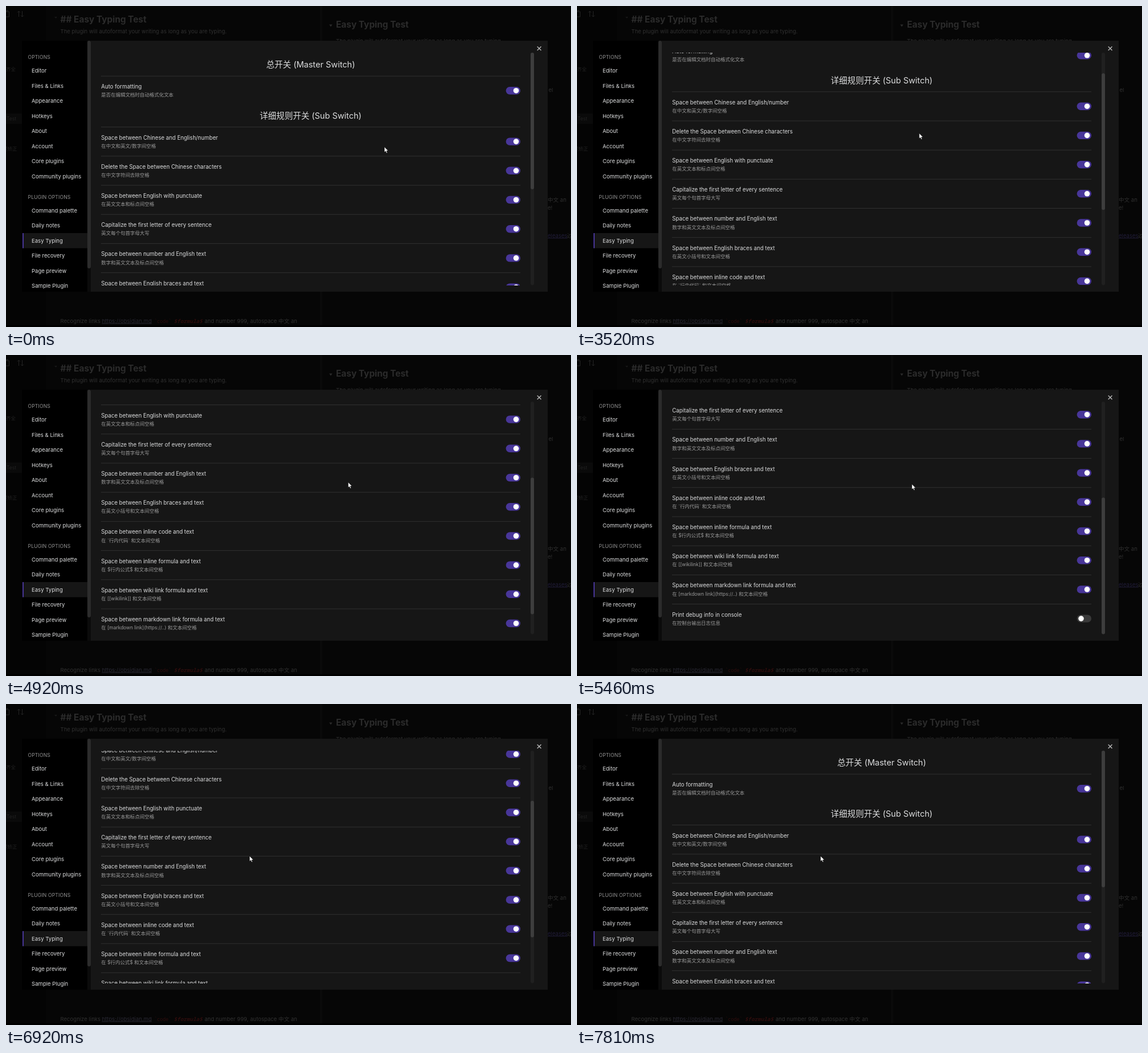
These frames come from a looping animation (993 px wide and 564 px high, 7.99 s). An HTML page:

```html
<!DOCTYPE html>
<html lang="zh-CN">
<head>
<meta charset="utf-8">
<title>Plugin settings</title>
<style>
  html, body { margin: 0; width: 100%; height: 100%; overflow: hidden; background: #000; }
  svg { display: block; font: 9.57px Inter, "Noto Sans CJK SC", "Noto Sans CJK", sans-serif; }
  text { white-space: pre; }
  .dim { fill: #303030; }
  .faint { font-size: 8.47px; fill: #222; }
  .title { font-size: 15.4px; font-weight: 700; fill: #2b2b2b; }
  .link { fill: #211d38; text-decoration: underline; }
  .url { fill: #292833; text-decoration: underline; }
  .mono { font: 8.3px "Noto Sans Mono", monospace; fill: #2e0d0d; }
  .formula { font: italic 700 9.3px "Noto Sans Mono", monospace; fill: #2e0d0d; }
  .nav { fill: #dcddde; }
  .name { font-size: 9.68px; fill: #dcddde; }
  .caps { font-size: 8.6px; letter-spacing: .15px; fill: #929292; }
  .head { font-size: 14.52px; fill: #dcddde; text-anchor: middle; }
  .desc { font-size: 8.47px; fill: #999; }
</style>
</head>
<body>
<svg id="stage" width="993" height="564" viewBox="0 0 993 564"></svg>
<script>
const LOOP = 7990, MAX_SCROLL = 287, ROW = 51.2;

const text = (x, y, str, cls) => `<text x="${x}" y="${y}" class="${cls}">${str}</text>`;
const rect = (x, y, w, h, fill, r = 0) =>
  `<rect x="${x}" y="${y}" width="${w}" height="${h}" rx="${r}" fill="${fill}"/>`;

function backdrop() {
  const intro = 'The plugin will autoformat your writing as long as you are typing.';
  return rect(0, 0, 993, 560.5, '#040404') + rect(70, 0, 923, 560.5, '#060606') +
    rect(552, 0, 4, 560.5, '#0a0a0a') + rect(0, 189, 28, 18, '#0a0a0a') +
    '<path d="M-2 10H5.5V19H-2M1 10V8H4M22.5 9V19M20 11.5L22.5 9L25 11.5M28.5 9V19M26 16.5L28.5 19L31 16.5" fill="none" stroke="#242424"/>' +
    '<path d="M85 19h5l-2.5 3z" fill="#181818"/><path d="M568 32.5h5.5l-2.7 4z" fill="#2b2b2b"/>' +
    text(95.5, 29, '## Easy Typing Test', 'title') +
    text(580, 38, 'Easy Typing Test', 'title') +
    text(95.5, 48.3, intro, 'dim') + text(580, 65, intro, 'dim') +
    text(0, 114, '齐全', 'faint') + text(-6, 254, '楚矫正', 'faint') +
    text(1, 201.3, 'Test', 'faint') +
    text(953.5, 151, 'el', 'dim') + text(952, 344, '中文 an', 'dim') + text(952, 358, 'e!', 'dim') +
    text(952, 406.5, 'eleases', 'link') + text(986, 406.5, '过', 'dim') +
    text(95.5, 556.5, 'Recognize links', 'dim') +
    text(168.5, 556.5, 'https://obsidian.md', 'url') +
    text(260.5, 556.5, '`code`', 'mono') + text(295, 556.5, '$formula$', 'formula') +
    text(349, 556.5, 'and number 999, autospace 中文 an', 'dim');
}

function sidebar() {
  const list = (names, y) => names.map((n, i) => text(45, y + i * 26.45, n, 'nav')).join('');
  return rect(28, 61, 924, 441, '#161616') + rect(28, 61, 115, 441, '#000') +
    rect(143, 61, 6, 441, '#0b0b0b') + rect(143, 61, 6, 400, '#2c2c2c', 3) +
    rect(29, 399, 114, 26.5, '#161616') + rect(29, 399, 2, 26.5, '#483699') +
    text(38.5, 93, 'OPTIONS', 'caps') + text(38.5, 338.5, 'PLUGIN OPTIONS', 'caps') +
    list(['Editor', 'Files &amp; Links', 'Appearance', 'Hotkeys', 'About', 'Account',
      'Core plugins', 'Community plugins'], 117.4) +
    list(['Command palette', 'Daily notes', 'Easy Typing', 'File recovery',
      'Page preview', 'Sample Plugin'], 363) +
    '<path d="M933.7 71.2l6.8 6.8m0-6.8l-6.8 6.8" stroke="#b4b4b4" stroke-width="1.5"/>';
}

function setting(y, name, desc, on = true) {
  return rect(167, y - .5, 737, 1, '#303030') +
    text(167.3, y + 22, name, 'name') + text(167.3, y + 36.2, desc, 'desc') +
    rect(878.6, y + 18.8, 25.4, 13.4, on ? '#483699' : '#3a3a3a', 6.7) +
    `<circle cx="${on ? 896.5 : 886}" cy="${y + 25.5}" r="4.8" fill="#fff"/>`;
}

const rules = [
  ['Space between Chinese and English/number', '在中文和英文/数字间空格'],
  ['Delete the Space between Chinese characters', '在中文字符间去除空格'],
  ['Space between English with punctuate', '在英文文本和标点间空格'],
  ['Capitalize the first letter of every sentence', '英文每个句首字母大写'],
  ['Space between number and English text', '数字和英文文本及标点间空格'],
  ['Space between English braces and text', '在英文小括号和文本间空格'],
  ['Space between inline code and text', '在 `行内代码` 和文本间空格'],
  ['Space between inline formula and text', '在 $行内公式$ 和文本间空格'],
  ['Space between wiki link formula and text', '在 [[wikilink]] 和文本间空格'],
  ['Space between markdown link formula and text', '在 [markdown link](https://..) 和文本间空格'],
  ['Print debug info in console', '在控制台输出日志信息', false]
];

const content = text(535.5, 108.3, '总开关 (Master Switch)', 'head') +
  setting(123.2, 'Auto formatting', '是否在编辑文档时自动格式化文本') +
  text(535.5, 198.2, '详细规则开关 (Sub Switch)', 'head') +
  rules.map((r, i) => setting(212.6 + i * ROW, ...r)).join('');

document.getElementById('stage').innerHTML = backdrop() + sidebar() +
  `<clipPath id="view"><rect x="150" y="82" width="770" height="409"/></clipPath>
  <g clip-path="url(#view)"><g id="page">${content}</g></g>` +
  rect(922, 82, 6, 408.5, '#202020', 3) +
  `<g id="thumb">${rect(922, 82, 6, 240, '#3d3d3d', 3)}</g>
  <path id="cursor" d="M0 0V9.6L2.2 7.6L3.7 11L5.3 10.3L3.9 7H6.9Z" fill="#fff" stroke="#000" stroke-width=".6"/>`;

// Motions: [start ms, number of 30 ms steps, target]
const wheel = [
  [2660, 8, 60.5], [3520, 8, 121], [4330, 10, 181.5], [4800, 8, 242], [5190, 8, MAX_SCROLL],
  [6390, 10, 166], [6860, 9, 105.5], [7480, 12, 0]
];
const moves = [[500, 18, [552, 248.5]], [2210, 6, [601.3, 223.5]], [5430, 12, [428, 267]]];

const clamp = v => Math.min(1, Math.max(0, v));
const smooth = v => v * v * (3 - 2 * v);
const mix = (a, b, k) => a + (b - a) * k;
const progress = (t, start, steps) => t < start ? 0 : clamp((Math.floor((t - start) / 30) + 1) / steps);

// One wheel notch settles early; two notches in a row take the whole span.
function scrollAt(t) {
  let pos = 0;
  for (const [start, steps, target] of wheel) {
    const u = progress(t, start, steps);
    const oneNotch = Math.abs(target - pos) < 70;
    pos = mix(pos, target, smooth(oneNotch ? clamp(1.18 * u - .057) : u ** 1.17));
    if (u < 1) break;
  }
  return pos;
}

function cursorAt(t) {
  let pos = [665, 247.5];
  for (const [start, steps, target] of moves) {
    const k = smooth(progress(t, start, steps));
    pos = pos.map((p, i) => mix(p, target[i], k));
  }
  return pos;
}

const page = document.getElementById('page');
const thumb = document.getElementById('thumb');
const cursor = document.getElementById('cursor');

function draw() {
  const t = performance.now() % LOOP;
  const s = scrollAt(t);
  page.setAttribute('transform', `translate(0 ${-s})`);
  thumb.setAttribute('transform', `translate(0 ${s / MAX_SCROLL * 168.5})`);
  cursor.setAttribute('transform', `translate(${cursorAt(t)})`);
  requestAnimationFrame(draw);
}
draw();
</script>
</body>
</html>
```
